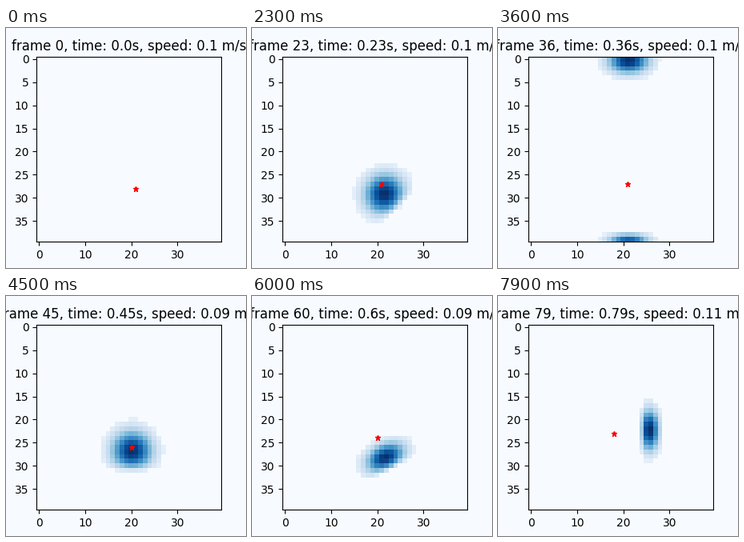
Animation, 300 px wide and 300 px high, one loop 8000 ms. Source, as a matplotlib script:

```python
import numpy as np
import matplotlib.pyplot as plt
from matplotlib.animation import FuncAnimation

N = 40          # cells per side of the periodic sheet
FRAMES = 80
PAPER = "#f7fbff"
WIDTH = 3.1     # bump width across its heading
SWING = 7       # how far the bump dips between two poses

# time step, x, y, width along the heading, heading in degrees
POSES = np.array([
    (0, 21, 28, 3.0, -90),
    (13, 28.1, 34.8, 1.7, -150),
    (23, 21.6, 29.2, 3.0, -135),
    (36, 21.2, 40.3, 2.0, -270),
    (45, 20.2, 26.8, 3.1, -90),
    (60, 21.8, 28.2, 2.0, -117),
    (79, 25.7, 22.3, 1.45, 0),
])

ROWS, COLS = np.mgrid[0:N, 0:N]


def wrap(d):
    return (d + N / 2) % N - N / 2


def pose(i):
    times = POSES[:, 0]
    x, y, depth, heading = (np.interp(i, times, col) for col in POSES.T[1:])
    phase = np.interp(i, times, np.arange(len(times)))
    y += SWING * abs(np.sin(np.pi * phase))
    return x, y, depth, np.radians(heading)


def activity(i):
    """Gaussian bump, squeezed along its heading and cut off behind."""
    if i == 0:
        return np.zeros((N, N))
    x, y, depth, a = pose(i)
    dx, dy = wrap(COLS - x), wrap(ROWS - y)
    ahead = (dx * np.cos(a) + dy * np.sin(a)) / depth
    across = (dy * np.cos(a) - dx * np.sin(a)) / WIDTH
    rear = 1 / (1 + np.exp(-(ahead + 1.3) / 0.15))
    rate = np.exp(-(ahead ** 2 + across ** 2) / 2) * rear
    rate[rate < 0.085] = 0
    return rate / rate.max()


def position(s):
    return round(21.2 - 3.1 * s ** 2.5), round(28.3 - 5.77 * s ** 1.5)


def speed(i, s):
    return round(0.1 + 0.015 * s * np.sin(np.pi * i / 33), 2)


fig, ax = plt.subplots(figsize=(3, 3), dpi=100, facecolor=PAPER)
image = ax.imshow(activity(0), cmap="Blues", vmin=0, vmax=1)
star, = ax.plot([], [], "r*", markersize=5)
ax.set_xlim(-0.5, N - 0.5)
ax.set_ylim(N - 0.5, -0.5)
ax.set_xticks(range(0, N, 10))
ax.set_yticks(range(0, N, 5))
title = ax.set_title("")


def update(i):
    s = i / (FRAMES - 1)
    x, y = position(s)
    image.set_data(activity(i))
    star.set_data([x], [y])
    title.set_text(f"frame {i}, time: {round(i * 0.01, 2)}s, "
                   f"speed: {speed(i, s)} m/s")
    return image, star, title


anim = FuncAnimation(fig, update, frames=FRAMES, interval=100,
                     repeat=True, repeat_delay=0, blit=False)
plt.show()
```
